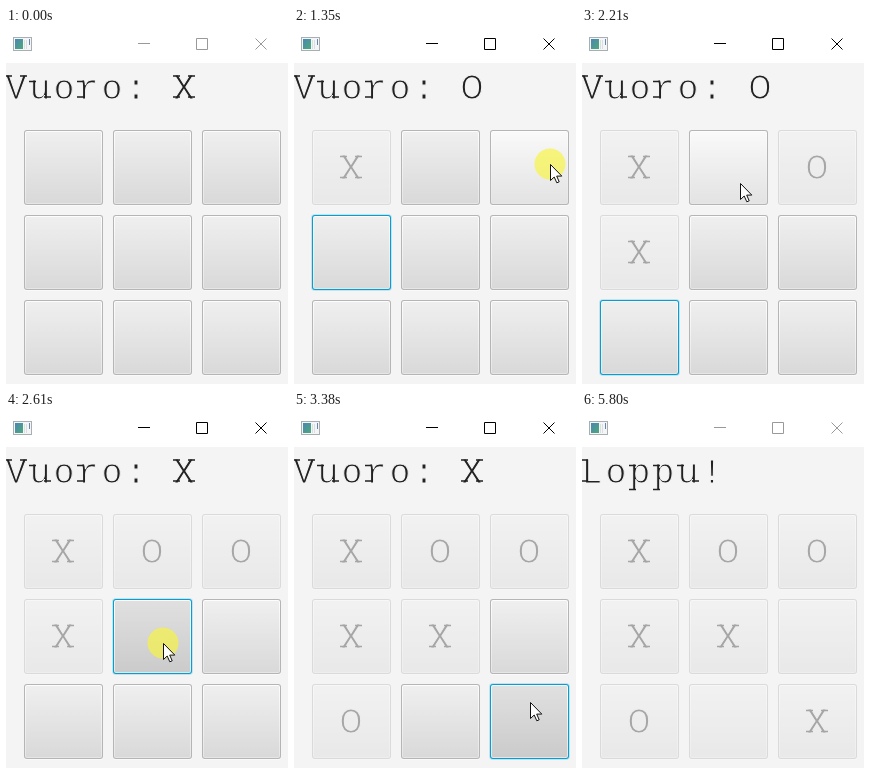
An HTML page for the animation above (5.88 s loop, 282x356 px).

```html
<!DOCTYPE html>
<html lang="fi">
<head>
<meta charset="utf-8">
<title>Ristinolla</title>
<style>
  html, body { margin: 0; width: 100%; height: 100%; overflow: hidden; background: #f4f4f4; }
  svg { display: block; width: 100vw; height: 100vh; }
  text { font: 35px "Liberation Mono", monospace; text-anchor: middle; stroke-width: 1.1; white-space: pre; }
  .cap { font: 34px Roboto, sans-serif; }
</style>
</head>
<body>
<svg viewBox="0 0 282 356">
  <defs>
    <linearGradient id="rest" x2="0" y2="1"><stop stop-color="#efefef"/><stop offset="1" stop-color="#d9d9d9"/></linearGradient>
    <linearGradient id="hover" x2="0" y2="1"><stop stop-color="#f9f9f9"/><stop offset="1" stop-color="#e3e3e3"/></linearGradient>
    <linearGradient id="pressed" x2="0" y2="1"><stop stop-color="#e0e0e0"/><stop offset="1" stop-color="#cbcbcb"/></linearGradient>
    <linearGradient id="edge" x2="0" y2="1"><stop stop-color="#fdfdfd"/><stop offset="1" stop-color="#e6e6e6"/></linearGradient>
    <linearGradient id="app" x2="1" y2="1"><stop stop-color="#4a86b8"/><stop offset="1" stop-color="#4fa878"/></linearGradient>
  </defs>
  <rect width="282" height="356" fill="#f4f4f4"/>
  <rect width="282" height="35" fill="#fff"/>
  <g>
    <rect x="7.5" y="9.5" width="18" height="13" fill="#f4f5f6" stroke="#a9aeb3"/>
    <rect x="9" y="11" width="8" height="10" fill="url(#app)"/>
    <path d="M18.5 12V21M20.5 12V21" stroke="#dcdfe2"/>
    <path d="M23.5 11V17" stroke="#6a86ad"/>
  </g>
  <path id="controls" fill="none" d="M132 15.5H144M190.5 10.5H201.5V21.5H190.5ZM249.5 10.5L260.5 21.5M260.5 10.5L249.5 21.5"/>
  <g id="status"></g>
  <g id="board"></g>
  <g id="pointer">
    <circle id="glow" r="15.5" fill="#f9f53c" opacity=".66"/>
    <path d="M.5 .5V16.5L4.2 13L6.8 18.8L9.2 17.8L6.7 12.1H11.8Z" fill="#fff" stroke="#111"/>
  </g>
</svg>
<script>
const LOOP = 5880, LEAD = 257, STEP = 5600 / 72;
const W = 79, H = 75, GAP = 10, LEFT = 18, TOP = 102;
const $ = id => document.getElementById(id);

// All times below count screen refreshes.
const click = (start, x, y, i) => ({
  at: [x, y], cell: cellAt(x, y), mark: 'XO'[i % 2],
  start, down: start + 1, dim: start + 2, done: start + 3
});
const clicks = [
  [5, 72, 140], [14, 256, 136], [20, 72, 225], [26, 158, 155],
  [29, 157, 231], [35, 60, 306], [38, 236, 290]
].map(([start, x, y], i) => click(start, x, y, i));

// The pointer glides to each click, then curves away and out of the window.
const glides = [];
let from = [150, 315], free = 0;
for (const c of clicks) {
  const b = Math.max(c.start - 1, free + 1);
  glides.push({ a: Math.max(free, b - 4), b, pts: [from, c.at] });
  from = c.at;
  free = c.done;
}
glides.push({ a: free, b: 50, pts: [from, [262, 154], [165, 154], [144, 307]] });
glides.push({ a: 51, b: 62, pts: [[144, 307], [143, 255], [150, 298], [187, 345]] });

function pointerAt(k) {
  const { a, b, pts } = glides.filter(g => g.a <= k).pop() || glides[0];
  const t = Math.min(1, Math.max(0, (k - a) / (b - a))), u = t * t * (3 - 2 * t);
  let p = pts;
  while (p.length > 1) {
    p = p.slice(1).map(([x, y], i) => [p[i][0] + (x - p[i][0]) * u, p[i][1] + (y - p[i][1]) * u]);
  }
  return p[0].map(Math.round);
}

function cellAt(x, y) {
  const dx = x - LEFT, dy = y - TOP, col = Math.floor(dx / (W + GAP)), row = Math.floor(dy / (H + GAP));
  const inside = Math.min(col, row) >= 0 && Math.max(col, row) < 3 &&
    dx % (W + GAP) < W && dy % (H + GAP) < H;
  return inside ? row * 3 + col : -1;
}

// Slab ends: a row (cap, x-height, base, descender) and a side
const rows = { c: -22.5, x: -17, b: -1.5, d: 7 };
const slabs = { X: 'cl cr bl br', V: 'cl cr', u: 'xl br', r: 'xl bl', L: 'cl bl', p: 'xl dl' };

function label(s, x, y, color, back) {
  const chars = [...s], mid = i => x + 24 * i;
  const ends = chars.map((ch, i) => (slabs[ch] || '').split(' ').filter(Boolean).map(
    ([row, side]) => `M${mid(i) + (side === 'l' ? -11 : 4)} ${y + rows[row]}h7`).join('')).join('');
  const body = s.replace(/[A-Z]/g, '<tspan class="cap">$&</tspan>');
  return `<text x="${chars.map((_, i) => mid(i)).join(' ')}" y="${y}" fill="${color}" stroke="${back}">${body}</text>` +
    `<path d="${ends}" stroke="${color}" stroke-width="1.7"/>`;
}

function box(x, y, inset, r, fill) {
  return `<rect x="${x + inset}" y="${y + inset}" width="${W - 2 * inset}" height="${H - 2 * inset}" rx="${r}" fill="${fill}"/>`;
}

function button(i, { mark, off, look, focus }) {
  const x = LEFT + i % 3 * (W + GAP), y = TOP + Math.floor(i / 3) * (H + GAP);
  const rim = focus
    ? box(x, y, -1, 4, '#039ed333') + box(x, y, 0, 3, '#039ed3')
    : box(x, y + 1, 0, 3, '#fafafa') + box(x, y, 0, 3, '#b5b5b5');
  return `<g opacity="${off ? .4 : 1}">${rim}` +
    box(x, y, 1, 2, 'url(#edge)') + box(x, y, 2, 1, `url(#${look})`) +
    (mark ? label(mark, x + 39, y + 49, '#333', '#e4e4e4') : '') + '</g>';
}

// Focus walks down the columns to the next free cell.
function focusedCell(k, marks) {
  const last = clicks.filter(c => c.down <= k).pop();
  let cell = last.cell;
  while (marks[cell]) cell = cell < 6 ? cell + 3 : (cell - 5) % 3;
  return cell;
}

function draw(k) {
  const active = k > 5 && k < 71;
  const placed = clicks.filter(c => c.done <= k);
  const begun = placed.length > 0, over = placed.length === clicks.length;
  const marks = {};
  for (const c of placed) marks[c.cell] = c.mark;

  const [px, py] = pointerAt(k);
  const hot = begun ? cellAt(px, py) : -1;
  const focus = begun && !over ? focusedCell(k, marks) : -1;
  const held = begun && clicks.find(c => c.down <= k && k < c.done);

  $('controls').setAttribute('stroke', active ? '#000' : '#999');
  $('status').innerHTML = label(over ? 'Loppu!' : 'Vuoro: ' + 'XO'[placed.length % 2], 10, 70.5, '#222', '#f4f4f4');
  $('board').innerHTML = Array.from({ length: 9 }, (_, i) => {
    const off = over || !!marks[i];
    const look = off ? 'rest' : held && held.cell === i ? 'pressed' : hot === i ? 'hover' : 'rest';
    return button(i, { mark: marks[i], off, look, focus: focus === i });
  }).join('');
  $('pointer').setAttribute('transform', `translate(${px} ${py})`);
  $('pointer').setAttribute('visibility', k >= 0 && k < 62 ? 'visible' : 'hidden');
  $('glow').setAttribute('opacity', clicks.some(c => c.start <= k && k < c.dim) ? .66 : 0);
}

let shown = null;
const start = performance.now();
function loop(now) {
  const t = Math.max(0, now - start) % LOOP;
  const k = Math.floor((t - LEAD) / STEP);
  if (k !== shown) draw(shown = k);
  requestAnimationFrame(loop);
}
loop(start);
</script>
</body>
</html>
```
